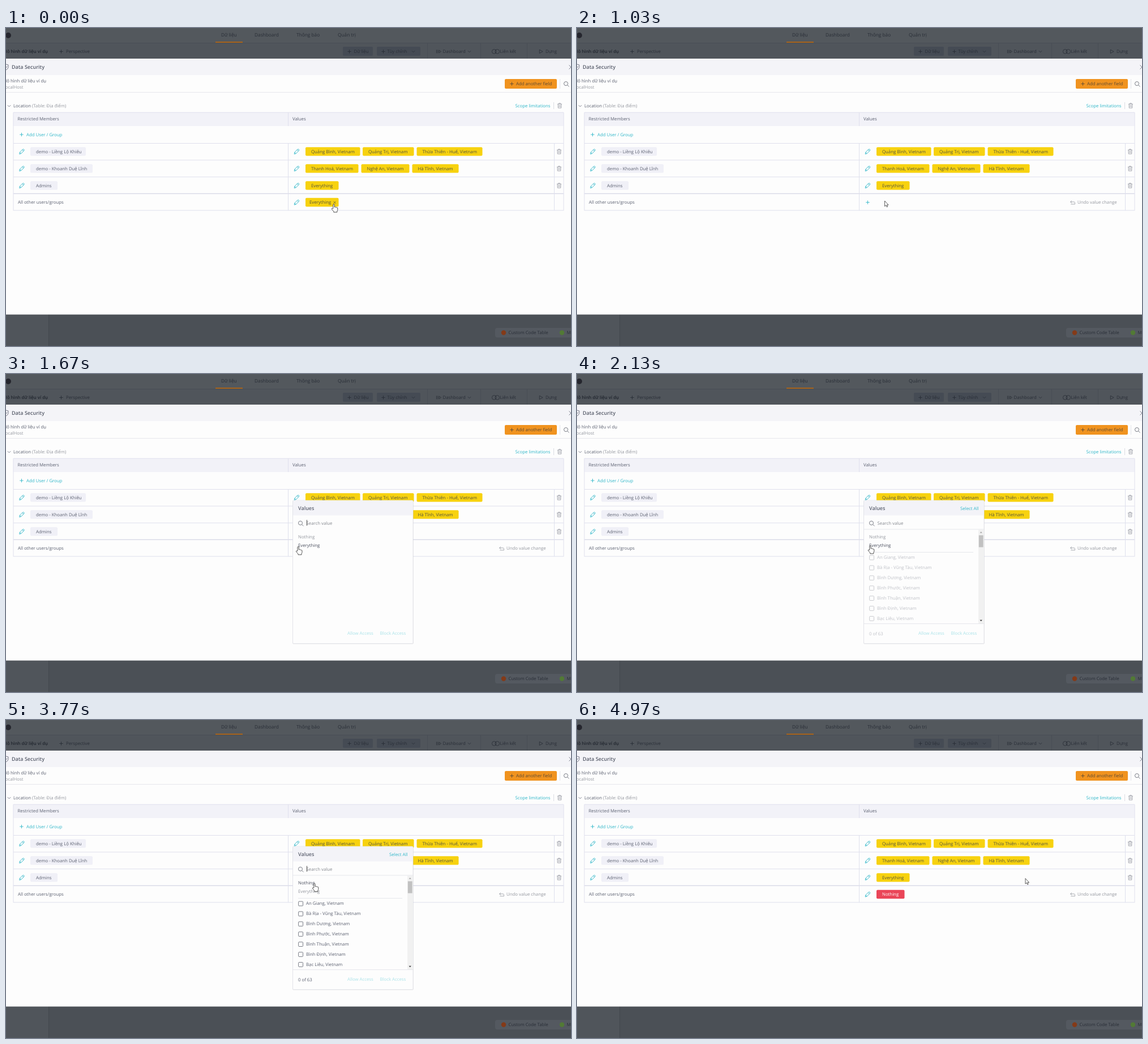
An HTML page for the animation above (5010 ms loop, 998 px wide and 561 px high).

```html
<!DOCTYPE html>
<html lang="vi">
<head>
<meta charset="utf-8">
<title>Data Security</title>
<style>
  html, body { margin: 0; width: 100%; height: 100%; overflow: hidden; background: #50555b; }
  svg { display: block; width: 998px; height: 561px; }
  text { font: 7.8px "Open Sans", "Noto Sans", sans-serif; text-rendering: geometricPrecision; white-space: pre; }
  .tab { font-size: 8.3px; }
  .semi { font-weight: 600; }
  .title { font-size: 9px; font-weight: 600; }
</style>
</head>
<body>
<svg id="stage" viewBox="0 0 998 561"></svg>
<script>
const LOOP = 5010;
const INK = '#5b6070', GREY = '#94979f', TEAL = '#2eb6c8', DIM = '#292e37';
const YELLOW = '#f7d20f', EDGE = '#dfe0ed';

// Drawing helpers: y is the vertical middle of a text or icon
const text = (x, y, s, fill = INK, more = '') =>
  `<text x="${x}" y="${y + 2.8}" fill="${fill}" ${more}>${s}</text>`;
const rect = (x, y, w, h, fill, more = '') =>
  `<rect x="${x}" y="${y}" width="${w}" height="${h}" fill="${fill}" ${more}/>`;
const path = (x, y, d, stroke, width = 0.8, fill = 'none') =>
  `<path transform="translate(${x} ${y})" d="${d}" stroke="${stroke}" stroke-width="${width}" fill="${fill}" stroke-linejoin="round"/>`;
const dot = (x, y, r, fill) => `<circle cx="${x}" cy="${y}" r="${r}" fill="${fill}"/>`;
const group = (id, body) => `<g id="${id}">${body}</g>`;
const hline = (x, y, w, c = EDGE, h = 1) => rect(x, y, w, h, c);
const vline = (x, y, h, c = EDGE) => rect(x, y, 1, h, c);

const plus = (x, y, c = TEAL) => path(x, y, 'M-3.2 0H3.2M0-3.2V3.2', c, 0.9);
const down = (x, y, c = INK) => path(x, y, 'M-2.6-1.3L0 1.3 2.6-1.3', c);
const lens = (x, y) => path(x, y, 'M2.3 2.3L5 5M3-.4A3.5 3.5 0 1 1-4-.4 3.5 3.5 0 1 1 3-.4Z', '#6a6e78', 0.9);
const pencil = (x, y) =>
  path(x, y, 'M-4.3 4.4L-3.6 1.2 1.7-4.1Q2.6-4.7 3.5-3.9 4.7-2.8 3.9-1.8L-1.4 3.6ZM.7-3.1L2.9-.9M-3.6 1.2L-1.4 3.6', TEAL, 0.9);
const bin = (x, y) =>
  path(x, y, 'M-4-2.8H4M-1.4-2.8V-4.2H1.4V-2.8M-3-2.8L-2.7 4.1H2.7L3-2.8M-1-1V2.5M1-1V2.5', '#8b8e98', 0.75);
const chip = (x, y, w, s, fill = YELLOW, ink = '#54533f', pad = 10) =>
  rect(x, y - 7.8, w, 15.4, fill, 'rx="2"') + text(x + pad, y, s, ink);

const ROWS = [218, 248, 278, 307.6];
const members = [[98, 'demo - Liềng Lộ Khiêu'], [110, 'demo - Khoanh Duệ Lĩnh'], [48, 'Admins']];
const values = [
  [[529, 96.5, 'Quảng Bình, Vietnam'], [630, 90.5, 'Quảng Trị, Vietnam'], [725.5, 116, 'Thừa Thiên - Huế, Vietnam']],
  [[529, 93.5, 'Thanh Hoá, Vietnam'], [627.5, 85, 'Nghệ An, Vietnam'], [717.5, 82, 'Hà Tĩnh, Vietnam']],
  [[529, 58.5, 'Everything']]
];
const places = ['An Giang', 'Bà Rịa - Vũng Tàu', 'Bình Dương', 'Bình Phước', 'Bình Thuận', 'Bình Định', 'Bạc Liêu'];

const backdrop = () =>
  rect(0, 0, 998, 561, '#50555b') + rect(0, 0, 998, 26, '#53585d') +
  dot(4, 13, 5, '#25262e') +
  text(380, 12.5, 'Dữ liệu', DIM, 'class="tab"') + text(439, 12.5, 'Dashboard', DIM, 'class="tab"') +
  text(513, 12.5, 'Thông báo', DIM, 'class="tab"') + text(586, 12.5, 'Quản trị', DIM, 'class="tab"') +
  hline(0, 26, 998, '#494e55') + rect(370, 24, 48, 2, '#a8641c') +
  text(74, 41, 'Mô hình dữ liệu ví dụ', '#20252e', 'class="semi" text-anchor="end"') +
  plus(97.5, 41.5, DIM) + text(106, 41.5, 'Perspective', DIM) +
  rect(595, 33, 53, 16, '#454b54', 'rx="2"') + plus(606.5, 41.5, DIM) + text(614.5, 41.5, 'Dữ liệu', DIM) +
  rect(655, 33, 77, 16, '#454b54', 'rx="2"') + plus(666.5, 41.5, DIM) + text(673.5, 41.5, 'Tùy chỉnh', DIM) +
  down(719.5, 41.5, DIM) +
  [744, 838, 920].map(x => vline(x, 27, 27, '#494e55')).join('') +
  path(764, 41.5, 'M-3.5-3V3M-1.2-3V3M1-2.5L4.5 0 1 2.5Z', DIM) + text(771.5, 41.5, 'Dashboard', DIM) + down(818.5, 41.5, DIM) +
  path(865, 41.5, 'M1 0A3.8 3.8 0 1 1-6.6 0 3.8 3.8 0 1 1 1 0ZM6.6 0A3.8 3.8 0 1 1-1 0 3.8 3.8 0 1 1 6.6 0Z', DIM) +
  text(872.5, 41.5, 'Liên kết', DIM) +
  path(945, 41.5, 'M-2.7-3.2L3.2 0-2.7 3.2Z', DIM) + text(953, 41.5, 'Dựng', DIM) +
  rect(76, 505, 922, 56, '#4b5056') + vline(75, 505, 56, '#42474d') +
  rect(864, 529, 150, 17, '#545960', 'rx="4"') +
  dot(879, 537.5, 4.2, '#843a18') + text(887.5, 537.5, 'Custom Code Table', DIM) +
  dot(982, 537.5, 4.2, '#527a35') + text(990.5, 537.5, 'Mô hình', DIM);

const panel = () =>
  rect(0, 54, 998, 451.5, '#fdfdfd') + rect(0, 54, 998, 29, '#f4f4f8') +
  path(0, 69, 'M-4-4L0-5 4-4V0Q4 3 0 5Q-4 3-4 0ZM-2 0L-.4 1.6 2.2-1.6', INK) +
  text(10, 69, 'Data Security', '#565b69', 'class="title"') +
  path(998, 69, 'M-3.5-3.5L3.5 3.5M3.5-3.5L-3.5 3.5', INK) +
  text(71, 93.5, 'Mô hình dữ liệu ví dụ', INK, 'text-anchor="end"') +
  text(30.5, 104, 'LocalHost', GREY, 'text-anchor="end"') +
  rect(881, 90, 92, 17, '#f0931f', 'rx="2"') + plus(893.5, 98.5, '#5c4a35') + text(901, 98.5, 'Add another field', '#5c4a35') +
  vline(978, 90, 17, '#e3e4ea') + lens(989.5, 98.5) + hline(0, 113, 998, '#e6e7ec') +
  down(5.5, 137.5) + text(13, 137, 'Location <tspan fill="#94979f">(Table: Địa điểm)</tspan>') +
  text(899.5, 137, 'Scope limitations', TEAL) + vline(967, 131, 12, '#dcdde3') + bin(978, 137) +
  rect(13, 149, 972, 24, '#f2f2f8') +
  text(20.5, 160.3, 'Restricted Members') + text(506, 160.3, 'Values') +
  plus(27.5, 188) + text(36, 188, 'Add User / Group', TEAL) +
  hline(13, 148.5, 972) + hline(13, 203, 972) + hline(13, 232.5, 972) + hline(13, 262.3, 972) +
  hline(13, 291.5, 972, '#d9dae8', 1.4) + hline(13, 321.3, 972) +
  vline(12.5, 149, 173) + vline(984.5, 149, 173) + vline(498, 149, 24) + vline(498, 203, 119) + vline(968, 203, 119) +
  ROWS.slice(0, 3).map(y => pencil(28, y) + bin(977, y)).join('') +
  text(21, 307.6, 'All other users/groups');

const filledRows = () => ROWS.slice(0, 3).map((y, i) =>
  chip(43, y, ...members[i], '#f0f0f7', INK) + pencil(513.5, y) +
  values[i].map(([x, w, s]) => chip(x, y, w, s)).join('')).join('');

const popup = () =>
  rect(506, 223.5, 214, 253, '#00000012', 'rx="2"') +
  rect(506.5, 223, 212.5, 252.5, '#fdfdfd', 'rx="1.5" stroke="#dcdde4" stroke-width=".7"') +
  rect(507, 223.4, 211.5, 26, '#f3f3f8') +
  text(516, 237, 'Values', '#5d6270', 'class="title"') +
  lens(520.5, 263.3) + text(530.5, 263, 'Search value', '#85888f') +
  group('caret', rect(531, 257.5, 0.9, 10, '#333')) +
  group('nothing', text(516, 287, 'Nothing', 'inherit')) +
  group('everything', text(516, 301.7, 'Everything', 'inherit')) +
  text(603, 457, 'Allow Access', '#a9e2e8') + text(660.5, 457, 'Block Access', '#a9e2e8') +
  group('frame',
    text(677, 237, 'Select All', TEAL) +
    hline(507, 273.5, 212, '#e6e7ec') + hline(516, 314, 184, '#e6e7ec') + hline(507, 440, 212, '#e6e7ec') +
    rect(709, 274.5, 9.5, 165.5, '#f1f1f1') + rect(709.8, 284.5, 7.8, 21, '#c1c1c1') +
    path(713.7, 279.3, 'M-2 1.2L0-1.2 2 1.2Z', 'none', 0, '#a0a0a0') +
    path(713.7, 435, 'M-2.2-1.2L0 1.2 2.2-1.2Z', 'none', 0, '#444')) +
  group('list',
    places.map((name, i) => {
      const y = 323.3 + i * 17.9;
      return rect(516.7, y - 3.2, 7.8, 7.8, '#fff', 'rx="1" stroke="#555a66" stroke-width=".8"') +
        text(530, y, name + ', Vietnam');
    }).join('') +
    text(516, 458.5, '0 of 63'));

stage.innerHTML = backdrop() + panel() +
  group('filled', filledRows()) +
  group('blank', ROWS.slice(0, 3).map(y => plus(513.5, y)).join('')) +
  group('before', pencil(513.5, 307.6) + chip(529, 307.6, 58.5, 'Everything', YELLOW, '#54533f', 7) +
    path(580.5, 307.8, 'M-2-2L2 2M2-2L-2 2', '#54533f')) +
  group('empty', plus(513.5, 307.6)) +
  group('after', pencil(513.5, 307.6) + chip(529, 307.6, 49.5, 'Nothing', '#ea4558', '#fff')) +
  group('undo', path(875.5, 307.8, 'M-1.5-3.2L-4-1 -1.5 1.2M-4-1H2.2Q4 -1 4 .8V3H-3.2', GREY) +
    text(884, 307.3, 'Undo value change', GREY)) +
  group('menu', popup()) +
  group('cursor',
    group('arrow', path(0, 0, 'M0 0V9.6L2.2 7.6 3.7 10.8 5.2 10.1 3.8 7.1H6.6Z', '#333', 0.8, '#fff')) +
    group('hand', path(0, 0, 'M-1.2 7.5V.9A1.1 1.1 0 0 1 1.1.9V5Q2.2 4.3 3.2 5.3 4.4 4.7 5.2 5.8 6.8 5.5 6.8 7V9.5Q6.8 11 5.8 12V14H-.2V12.5L-3.6 8.6Q-4.2 7.4-2.8 7.2Z', '#333', 0.85, '#fff')));

const el = id => document.getElementById(id);
const show = (id, on) => el(id).setAttribute('opacity', Number(on));
const ramp = (t, a, b) => Math.min(1, Math.max(0, (t - a) / (b - a)));
const within = (t, a, b) => t >= a && t < b;

// Pointer stops: time, x, y
const stops = [
  [0, 579, 311], [540, 579, 311], [700, 569, 305], [1380, 516, 305], [1600, 516, 305],
  [2000, 518, 303], [2850, 518, 303], [3450, 545, 288.5], [4320, 545, 289], [4790, 792, 279.5], [LOOP, 792, 279.5]
];
function pointer(t) {
  const i = stops.findIndex(s => s[0] > t);
  const [a, ax, ay] = stops[i - 1], [b, bx, by] = stops[i];
  const p = ramp(t, a, b), k = p * p * (3 - 2 * p);
  return [ax + (bx - ax) * k, ay + (by - ay) * k];
}

const CLEARED = 590, OPENED = 1400, PICKED = 3830, RELOAD = 3950, DONE = 4100;

function draw(t) {
  const reloading = within(t, CLEARED, 800) || within(t, RELOAD, DONE);
  show('filled', !reloading);
  show('blank', reloading);
  show('before', t < CLEARED);
  show('empty', within(t, CLEARED, DONE));
  show('after', t >= DONE);
  show('undo', t >= CLEARED);

  show('menu', ramp(t, OPENED, 1560) * (1 - ramp(t, PICKED, 3930)));
  show('frame', t >= 1700);
  show('list', ramp(t, 1980, 2380));
  show('caret', Math.floor((t - OPENED) / 530) % 2 === 0);

  const [x, y] = pointer(t), hand = t < CLEARED || within(t, 1600, PICKED + 20);
  const overMenu = within(t, 1600, PICKED + 100);
  el('nothing').setAttribute('fill', overMenu && y < 295 ? '#4a4f5e' : GREY);
  el('everything').setAttribute('fill', overMenu && y >= 295 ? '#4a4f5e' : GREY);
  el('cursor').setAttribute('transform', `translate(${x} ${y})`);
  show('hand', hand);
  show('arrow', !hand);
}

const start = performance.now();
function tick() {
  draw((performance.now() - start) % LOOP);
  requestAnimationFrame(tick);
}
tick();
</script>
</body>
</html>
```
